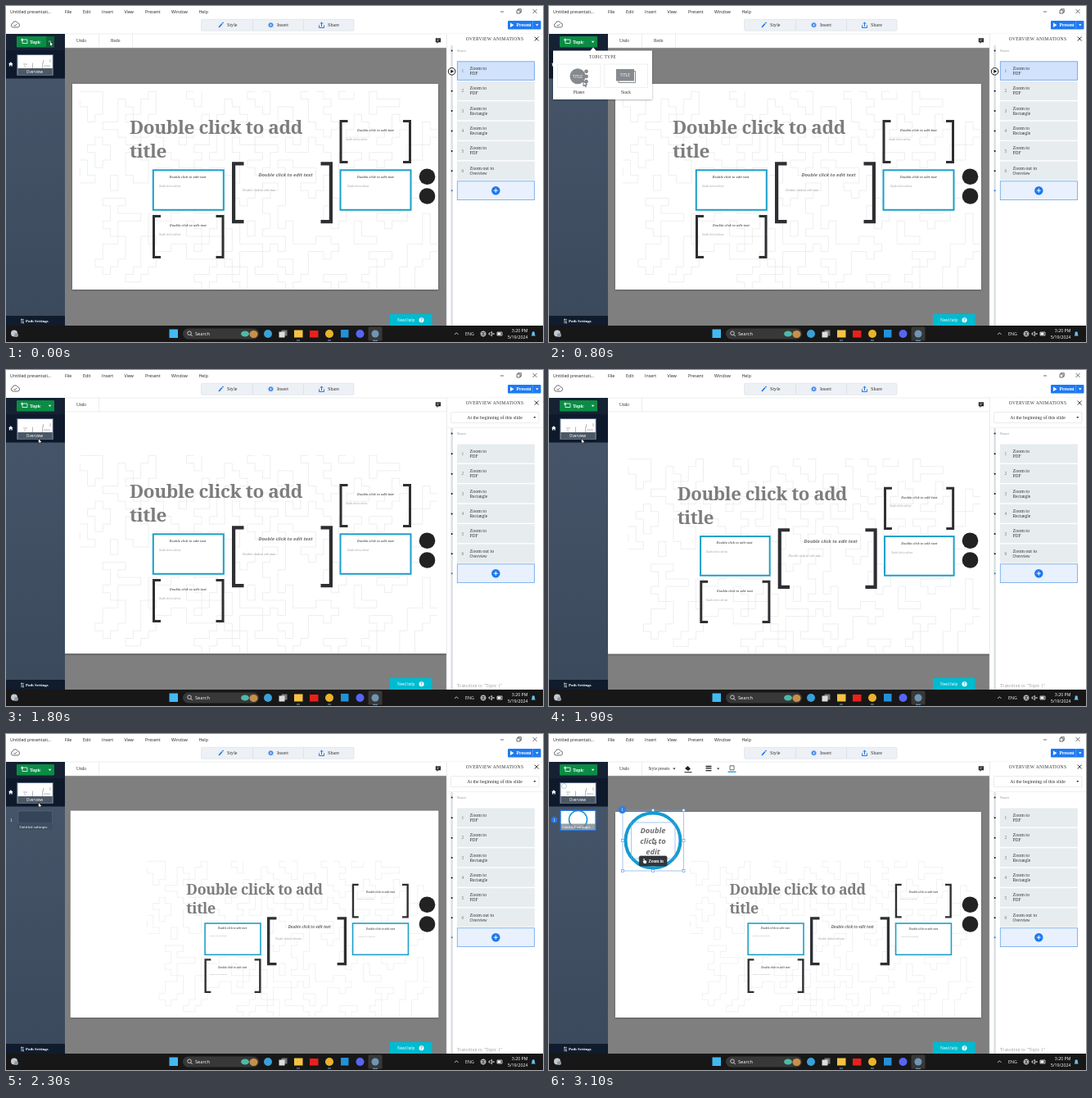
Write an HTML page that moves like this. It is 656 px wide and 410 px high and loops after 3600 ms.

```html
<!DOCTYPE html>
<html lang="en">
<head>
<meta charset="utf-8">
<title>Adding a topic</title>
<style>
html, body { margin: 0; width: 100%; height: 100%; overflow: hidden; background: #fff; }
svg { display: block; width: 100vw; height: 100vh; }
text { font: 5.4px "Liberation Serif", serif; fill: #333; }
.sans, .sans text { font-family: "Open Sans", sans-serif; font-size: 5.25px; fill: #222; }
.mid { text-anchor: middle; }
.bold { font-weight: 700; }
.white, .white text { fill: #fff; }
.nav text { font-size: 6.1px; }
.row { font-size: 6px; }
.spaced { letter-spacing: .35px; }
.heading { font: 600 22.5px "Noto Serif", serif; letter-spacing: -.4px; fill: #7d7d7d; }
.label { font: italic 700 4px "Open Sans", sans-serif; fill: #707070; text-anchor: middle; }
.body { font: italic 2.6px "Open Sans", sans-serif; fill: #999; }
.line { fill: none; stroke: #333; stroke-width: .7; }
</style>
</head>
<body>
<svg viewBox="0 0 656 410" preserveAspectRatio="none">
  <defs>
    <clipPath id="stageClip"><rect x="72" y="51" width="466" height="339"/></clipPath>
    <linearGradient id="side" x2="0" y2="1"><stop stop-color="#47566a"/><stop offset="1" stop-color="#3b495d"/></linearGradient>
    <filter id="shadow" x="-10%" y="-10%" width="120%" height="125%"><feDropShadow dx="0" dy=".7" stdDeviation="1.2" flood-opacity=".35"/></filter>
  </defs>
  <rect width="656" height="410" fill="#fff"/>

  <!-- window title and menus -->
  <g class="sans" id="menu">
    <text x="5" y="8.5">Untitled presentati...</text>
  </g>
  <path class="line" d="M604 7h4M624 5h4v4h-4zM625.5 5v-1.3h3.8v4h-1.3M643.5 4l5 5m0-5l-5 5"/>
  <path class="line" d="M8.5 26a2.5 2.5 0 0 1-.5-4.8a3.3 3.3 0 0 1 6.2-.5a2.7 2.7 0 0 1 .3 5.3zM9.5 23l1.4 1.4l2.4-2.5"/>
  <g class="nav">
    <rect x="238.5" y="16.3" width="186.5" height="14" rx="1.5" fill="#edf0f4" stroke="#d8dde4" stroke-width=".6"/>
    <path d="M301.5 16.5v13.5M363.5 16.5v13.5" stroke="#d5dae1" stroke-width=".6"/>
    <path d="M260 26l4-4.5M264.5 21l1-1" stroke="#2275e8" stroke-width="1.6"/>
    <circle cx="323.5" cy="23.2" r="2.8" fill="#2275e8" stroke="#8bb8f2"/><path d="M322 23.2h3M323.5 21.7v3" stroke="#fff" stroke-width=".7"/>
    <path d="M382.5 23.5v3h6v-3M385.5 25v-5m-1.8 1.8l1.8-1.8l1.8 1.8" fill="none" stroke="#2275e8" stroke-width="1"/>
    <text x="270" y="25.2">Style</text><text x="331" y="25.2">Insert</text><text x="393" y="25.2">Share</text>
  </g>
  <rect x="613" y="18" width="40.5" height="10.5" rx="1" fill="#1e7af2"/>
  <path d="M643.5 18v10.5" stroke="#5ea3fa" stroke-width=".6"/>
  <path d="M616 20.5l4.5 2.7l-4.5 2.7zM647 22.3h3.600l-1.800 2.200z" fill="#fff"/>
  <text class="bold white" x="623.5" y="25" style="font-size:5.7px">Present</text>

  <!-- editing area -->
  <rect x="72" y="51" width="466" height="339" fill="#7f7f7f"/>
  <g clip-path="url(#stageClip)">
    <rect id="page" x="81" y="95" width="447" height="251" fill="#fff" filter="url(#shadow)"/>
    <g id="content">
      <path id="pattern" fill="none" stroke="#dfe4e4" stroke-width=".6"/>
      <text class="heading" x="151" y="156">Double click to add</text>
      <text class="heading" x="151" y="185">title</text>
      <g id="boxes"></g>
    </g>
    <circle cx="514.5" cy="208.2" r="9.8" fill="#222"/><circle cx="514.5" cy="232" r="9.8" fill="#222"/>
    <g data-show="2400 3600">
      <g id="planet">
        <circle cx="127" cy="130" r="33.5" fill="#fff" stroke="#149bd2" stroke-width="4"/>
        <g id="planetText"></g>
      </g>
    </g>
    <g data-show="2600 3600">
      <path d="M90 93h74.5v74h-74.5zM100.5 108h53.5v44h-53.5z" fill="none" stroke="#6f9fe0" stroke-width=".6"/>
      <g id="handles"></g>
      <circle cx="89.5" cy="92.5" r="4.6" fill="#2b7fe6"/><text class="mid white" x="89.5" y="94.3">1</text>
    </g>
    <g data-show="2900 3600">
      <rect x="110.3" y="149" width="33.7" height="12" rx="1.5" fill="#33373d" stroke="#23262a" stroke-width=".7"/>
      <path d="M116 158l-1.5-2.5l1-.3v-3.2h1v2l2.7.7v1.5l-.7 1.8z" fill="#fff"/>
      <text class="bold white" x="121.5" y="156.8" style="font-size:5.1px">Zoom in</text>
    </g>
  </g>
  <rect x="72" y="34" width="466" height="16.8" fill="#fff"/>
  <path d="M72 34h584M113.5 34v16.5M72 50.8h466" stroke="#dde1e5" stroke-width=".6"/>
  <text x="86" y="44">Undo</text>
  <g data-show="0 1800"><text x="128" y="44">Redo</text><path d="M154.5 34v16.5" stroke="#dde1e5" stroke-width=".6"/></g>
  <g data-show="2600 3600">
    <text x="121.5" y="44" style="font-size:5.1px">Style presets</text>
    <path d="M151.3 41.5h3.4l-1.7 2zM205 41.5h3.4l-1.7 2z" fill="#333"/>
    <path d="M166 42l3.5-3l3.5 3.5l-3 2.5z" fill="#222"/><path d="M165.5 46.7h9" stroke="#222"/>
    <path d="M191.5 39.5h7M191.5 41.8h7M191.5 44.7h7" stroke="#222" stroke-width="1.3"/>
    <path class="line" d="M221 38.8h5v5h-5z"/><path d="M218.5 46.2h10" stroke="#149bd2" stroke-width="1.3"/>
  </g>
  <path d="M524.8 39.3h6.2v5h-3l-1.5 1.7v-1.7h-1.7z" fill="#222"/><path d="M526 41h3.8M526 42.6h2.5" stroke="#fff" stroke-width=".5"/>
  <rect x="469" y="376" width="51.5" height="14" fill="#00bbd0"/>
  <text class="white" x="478" y="385" style="font-size:5.2px">Need help</text>
  <circle cx="507.5" cy="383.2" r="3" fill="#fff"/><text class="mid bold" x="507.5" y="385" style="fill:#00a5b8">?</text>

  <!-- sidebar -->
  <rect y="34" width="72" height="356" fill="url(#side)"/>
  <rect y="34" width="72" height="20" fill="#152233"/><rect y="54" width="72" height="34.5" fill="#0e1a2c"/>
  <rect x="13" y="37" width="46" height="13.5" rx="1.2" fill="#0b8c45"/>
  <path data-show="0 400" d="M49 37h9q1 0 1 1v11.5q0 1-1 1h-9z" fill="#086635"/>
  <path d="M51.8 42.8h3.6l-1.8 2.2z" fill="#fff"/>
  <path d="M20 41h6v4.5h-6zM17.8 41.2h3.4M19.5 39.5v3.4" fill="none" stroke="#fff" stroke-width=".8"/>
  <text class="bold white" x="29" y="45.8" style="font-size:5.8px">Topic</text>
  <path d="M3 71l2.8-2.7l2.8 2.7h-.9v2.5h-1.3v-1.6h-1.2v1.6h-1.3v-2.5z" fill="#fff"/>
  <rect x="13.8" y="59.5" width="43.5" height="25" fill="#fff" stroke="#596a80"/>
  <path d="M21 71h5M23 75v-2.500M32.500 69.500v6.500M44.500 69.500v6.500M45.500 66v4M54 65v4M46 73h8" fill="none" stroke="#888" stroke-width=".6"/>
  <circle data-show="2500 3600" cx="18.5" cy="63.5" r="3" class="line" style="stroke:#9bb"/>
  <rect x="14.3" y="76" width="42.5" height="8" fill="#4d5866"/>
  <text class="sans mid" x="35" y="81.7" style="font-size:4.7px;fill:#fff">Overview</text>
  <g data-show="2200 3600">
    <text class="white" x="5" y="106.5">1</text>
    <rect x="15" y="94" width="41.5" height="15" fill="#364459" stroke="#607087" stroke-width=".5"/>
    <rect x="14" y="109" width="43" height="8" fill="#3f4d61"/>
  </g>
  <g data-show="2500 3600">
    <circle cx="6.5" cy="104.7" r="3.8" fill="#2478e5"/><text class="mid white" x="6.5" y="106.5">1</text>
    <rect x="14" y="93.3" width="43" height="24" fill="#fff"/>
    <circle cx="35.5" cy="104.5" r="11" fill="none" stroke="#149bd2" stroke-width="1.6"/>
    <rect x="14" y="109.5" width="43" height="7.3" fill="#7d8590" opacity=".8"/>
    <rect x="14" y="93.3" width="43" height="24" fill="none" stroke="#2478e5" stroke-width="1.3"/>
  </g>
  <text data-show="2200 3600" class="mid white" x="33.5" y="114.8" style="font-size:5px">Untitled subtopic</text>
  <rect y="378" width="72" height="12" fill="#101c2d"/>
  <path d="M18 382.5h4M18 384.5h4M18 386.5h4M19 381.5v2M21 385.5v2" stroke="#fff" stroke-width=".6"/>
  <text class="bold white" x="24" y="386" style="font-size:4.9px">Path Settings</text>

  <!-- animation list -->
  <rect x="538" y="34" width="118" height="356" fill="#fff"/>
  <path d="M538.3 34v356" stroke="#d8dce0" stroke-width=".6"/>
  <path id="track" stroke="#dbe0e4" stroke-width="2.5"/>
  <text class="mid spaced" x="597" y="42.2" style="font-size:5.5px">OVERVIEW ANIMATIONS</text>
  <path class="line" d="M645.7 37.5l5 5m0-5l-5 5" style="stroke-width:1"/>
  <g data-show="1800 3600">
    <rect x="543.5" y="51.5" width="107.5" height="13" rx="1" fill="#fff" stroke="#dfe3e7" stroke-width=".7"/>
    <text class="mid" x="597" y="59.8" style="font-size:5.8px">At the beginning of this slide</text>
    <path d="M644.3 57h3l-1.5 2z" fill="#333"/>
    <path d="M538 70.5h118" stroke="#e5e8eb" stroke-width=".6"/>
    <text class="spaced" x="551" y="386.5" style="font-size:5.2px;fill:#999">Transition to "Topic 1"</text>
  </g>
  <g id="list"></g>

  <!-- topic type popup -->
  <g data-show="400 1700">
    <path d="M5 54.5h45.5l3.5-4l3.5 4h68.5v59.5h-121z" fill="#fff" filter="url(#shadow)"/>
    <text class="mid spaced" x="65.5" y="64" style="font-size:5.3px">TOPIC TYPE</text>
    <path d="M10.5 71h52.5v28.5h-52.5zM67.5 71h53v28.5h-53z" fill="#fff" stroke="#e6e8ea" stroke-width=".7"/>
    <circle cx="35" cy="85.7" r="9.5" fill="#868a8e"/>
    <g fill="#868a8e"><circle cx="45.5" cy="79.8" r="2.4"/><circle cx="45.5" cy="86" r="2.4"/><circle cx="45.5" cy="92.2" r="2.4"/></g>
    <path d="M85 79.5h20.5v14h-20.5z" fill="#fff" stroke="#868a8e"/>
    <path d="M82 77h22v14.5h-22z" fill="#868a8e"/>
    <g class="sans mid bold"><text x="35" y="87.5" style="font-size:5px;fill:#fff">TITLE</text><text x="93" y="86" style="font-size:5px;fill:#fff">TITLE</text></g>
    <text class="mid" x="36.5" y="107.3">Planet</text><text class="mid" x="94" y="107.3">Stack</text>
  </g>

  <!-- taskbar -->
  <g class="sans white">
    <rect y="390" width="656" height="20" fill="#171717"/>
    <circle cx="10" cy="399.5" r="4" fill="#c3cad1"/><circle cx="12.5" cy="401.5" r="2.5" fill="#8f9aa5"/>
    <rect x="199.5" y="394.5" width="10.5" height="10.5" fill="#43b9f2"/>
    <rect x="216" y="393.5" width="93" height="13" rx="6.5" fill="#383838"/>
    <circle cx="224" cy="399.2" r="2.3" class="line" style="stroke:#fff"/><path d="M225.7 401l2 2" stroke="#fff" stroke-width=".8"/>
    <text x="231" y="402" style="font-size:5.7px">Search</text>
    <ellipse cx="292" cy="400" rx="5" ry="3.5" fill="#4eb9a9"/><ellipse cx="302.5" cy="400.5" rx="5" ry="4.5" fill="#c98f48"/>
    <circle cx="320" cy="400" r="5" fill="#3aa0d8"/>
    <path d="M336.5 395.5h7v7h-7z" fill="#777"/><path d="M333.5 397.5h7v7h-7z" fill="#ddd"/>
    <rect x="352" y="395.5" width="10.5" height="9" fill="#f5c244"/>
    <rect x="371" y="396" width="10.5" height="8.5" fill="#e9201c"/>
    <circle cx="395" cy="400" r="5" fill="#e8b52a"/>
    <rect x="409" y="395" width="9.5" height="9.5" fill="#2490d8"/>
    <circle cx="432.5" cy="400" r="5" fill="#5865f2"/>
    <rect x="442.5" y="391.5" width="17" height="17" rx="1.5" fill="#383838"/>
    <circle cx="451" cy="400" r="4.5" fill="#6f96b5"/>
    <path d="M355 408h4M393 408h4M448 408.3h6" stroke="#8ac6ee" stroke-width=".8"/>
    <g class="line" style="stroke:#fff">
      <path d="M548 401l2.3-2.3l2.3 2.3M580 400h6M583 397c-2 2-2 4 0 6c2-2 2-4 0-6M590 399v2h1.5l2 1.7v-5.4l-2 1.7zM594.5 399l2 2m0-2l-2 2M600 398h6v4h-6z"/>
      <circle cx="583" cy="400" r="3.1"/>
    </g>
    <path d="M600.5 398.5h4v3h-4z" fill="#fff"/>
    <path d="M641.5 402.5l1-1.5v-2a1.7 1.7 0 0 1 3.4 0v2l1 1.5z" fill="#69c3f5"/>
    <text x="561" y="402">ENG</text>
    <text x="637.5" y="398" text-anchor="end">3:20 PM</text><text x="637.5" y="406.3" text-anchor="end">5/19/2024</text>
  </g>
  <path id="cursor" d="M0 0v6.2l1.5-1.3l1 2.3l1-.5l-1-2.2h2z" fill="#fff" stroke="#111" stroke-width=".6"/>
</svg>
<script>
const LOOP = 3600, STEP = 100, LAST = 3100;
const $ = id => document.getElementById(id);
const text = (x, y, cls, str, style = '') => `<text x="${x}" y="${y}" class="${cls}" style="${style}">${str}</text>`;
const rect = (x, y, w, h, attrs) => `<rect x="${x}" y="${y}" width="${w}" height="${h}" ${attrs}/>`;

const menus = { File: 72, Edit: 94, Insert: 117, View: 144.5, Present: 170, Window: 202, Help: 235.5 };
$('menu').innerHTML += Object.entries(menus).map(([name, x]) => text(x, 8.5, '', name)).join('');

// Outlines of crosses with randomly missing arms
function patternPath(cols, rows, size) {
  let seed = 11, d = '';
  const random = () => (seed = (seed * 16807) % 2147483647) / 2147483647;
  const filled = new Set(), key = (c, r) => r * cols + c;
  for (let i = 0; i < 170; i++) {
    const c = 1 + Math.floor(random() * (cols - 2)), r = 1 + Math.floor(random() * (rows - 2));
    filled.add(key(c, r));
    for (const [dc, dr] of [[1, 0], [-1, 0], [0, 1], [0, -1]])
      if (random() < .6) filled.add(key(c + dc, r + dr));
  }
  for (let r = 1; r < rows; r++) for (let c = 1; c < cols; c++) {
    const at = `M${(81 + c * size).toFixed(1)} ${(95 + r * size).toFixed(1)}`, here = filled.has(key(c, r));
    if (here !== filled.has(key(c - 1, r))) d += `${at}v${size}`;
    if (here !== filled.has(key(c, r - 1))) d += `${at}h${size}`;
  }
  return d;
}
$('pattern').setAttribute('d', patternPath(48, 27, 9.3));

const PROMPT = 'Double click to edit text';
function bracket(x, y, w, h, arm, weight) {
  const i = weight / 2;
  return `<path d="M${x + arm} ${y + i}H${x + i}V${y + h - i}H${x + arm}M${x + w - arm} ${y + i}H${x + w - i}V${y + h - i}H${x + w - arm}"
    fill="none" stroke="#2e2f32" stroke-width="${weight}"/>`;
}
const frame = (x, y) => rect(x + 1, y + 1, 86, 48.5, 'fill="#fff" stroke="#1b9fc9" stroke-width="2"');
const caption = (cx, y, bx) => text(cx, y, 'label', PROMPT) + text(bx, y + 11, 'body', PROMPT);
$('boxes').innerHTML =
  frame(178.8, 199.3) + caption(222, 209.5, 187) +
  frame(407.5, 199.3) + caption(451.5, 210.3, 417) +
  bracket(407.5, 139, 87.5, 53, 10, 3) + caption(451.5, 153, 415) +
  bracket(179, 255, 87.5, 53, 10, 3) + caption(222.5, 269.4, 187) +
  bracket(276, 190.3, 123, 75, 14.5, 4.2) +
  text(341.5, 208, 'label', PROMPT, 'font-size:5.9px') + text(289, 226, 'body', PROMPT, 'font-size:3.9px');

$('planetText').innerHTML = ['Double', 'click to', 'edit']
  .map((word, i) => text(127, 120.5 + i * 13.3, 'label', word, 'font-size:9.4px')).join('');
for (const x of [90, 127.2, 164.5]) for (const y of [93, 130, 167])
  if (x !== 127.2 || y !== 130) $('handles').innerHTML += rect(x - 1.5, y - 1.5, 3, 3, 'fill="#fff" stroke="#4f8fe6" stroke-width=".6"');

const dot = (y, color) => `<circle cx="544.6" cy="${y}" r="1" fill="${color}"/>`;
const steps = ['PDF', 'PDF', 'Rectangle', 'Rectangle', 'PDF', 'Overview'];
$('list').innerHTML = text(551, 56.2, 'spaced', 'Start', 'font-size:5px;fill:#888') + dot(54.5, '#222') +
  steps.map((name, i) => {
    const y = 67.5 + i * 24.4;
    const selected = i ? '' : rect(551.3, y + .3, 94.2, 22.5, 'fill="#d0e2fc" stroke="#6c9fe8" stroke-width=".8" data-show="0 1800"');
    return rect(551, y, 94.8, 23, 'fill="#e7ecef"') + selected + dot(y + 11.8, '#111') +
      text(556.5, y + 13.5, '', i + 1, 'fill:#777') +
      text(566.5, y + 10.3, 'row', i === 5 ? 'Zoom out to' : 'Zoom to') + text(566.5, y + 16.3, '', name);
  }).join('') +
  `<g data-show="0 1800"><circle cx="544.6" cy="79.8" r="4.3" fill="#fff" stroke="#111"/><path d="M543.3 77.6l3.8 2.2l-3.8 2.2z" fill="#111"/></g>` +
  rect(551.3, 213.8, 94.2, 22.8, 'fill="#e8f1fd" stroke="#6ba4ec" stroke-width=".8"') + dot(225.2, '#2478e5') +
  '<circle cx="598.3" cy="225.2" r="5.2" fill="#1e78ee"/><path d="M595.8 225.2h5M598.3 222.7v5" stroke="#fff"/>';

const ease = p => .5 - .5 * Math.cos(Math.PI * Math.min(1, Math.max(0, p)));
const between = (t, from, to) => ease((t - from) / (to - from));
const scaleAt = (cx, cy, s) => `translate(${cx} ${cy}) scale(${s}) translate(${-cx} ${-cy})`;

// Pointer stops: time, x, y
const stops = [[0, 53.5, 43], [300, 53.5, 43], [800, 42, 91.5], [1000, 42, 91.5], [1400, 64, 88.5],
  [1700, 39.5, 83.5], [2400, 39.5, 83.5], [3000, 127, 128], [LOOP, 127, 128]];
function pointer(t) {
  const i = stops.findIndex(stop => stop[0] > t);
  const [t0, x0, y0] = stops[i - 1], [t1, x1, y1] = stops[i], p = between(t, t0, t1);
  return `translate(${x0 + (x1 - x0) * p} ${y0 + (y1 - y0) * p})`;
}

// The page jumps to its enlarged size, then page and content shrink to fit, drifting slightly on the way
function zoomOut(t) {
  const shrink = between(t, 1810, 2310), settle = between(t, 1810, 2350);
  const drift = 1.5 * Math.sin(Math.PI * shrink);
  const place = scale => `translate(${drift} ${drift}) ${scaleAt(480, 346.2, scale)}`;
  $('content').setAttribute('transform', place(1 - .211 * shrink));
  $('page').setAttribute('transform', place(t < 1800 ? 1 : 1.267 - .267 * settle));
}

const timed = [...document.querySelectorAll('[data-show]')].map(el => [el, ...el.dataset.show.split(' ').map(Number)]);
function render(t) {
  for (const [el, from, to] of timed) el.style.display = t >= from && t < to ? '' : 'none';
  zoomOut(t);
  $('planet').setAttribute('transform', scaleAt(127, 130, .4 + .6 * between(t, 2300, 2600)));
  $('list').setAttribute('transform', `translate(0 ${t < 1800 ? 0 : 23})`);
  $('track').setAttribute('d', `M544.6 ${t < 1800 ? 48 : 71}V390`);
  $('cursor').setAttribute('transform', pointer(t));
}

const start = performance.now();
function tick() {
  const t = (performance.now() - start) % LOOP;
  render(Math.min(LAST, Math.floor(t / STEP) * STEP));
  requestAnimationFrame(tick);
}
tick();
</script>
</body>
</html>
```
